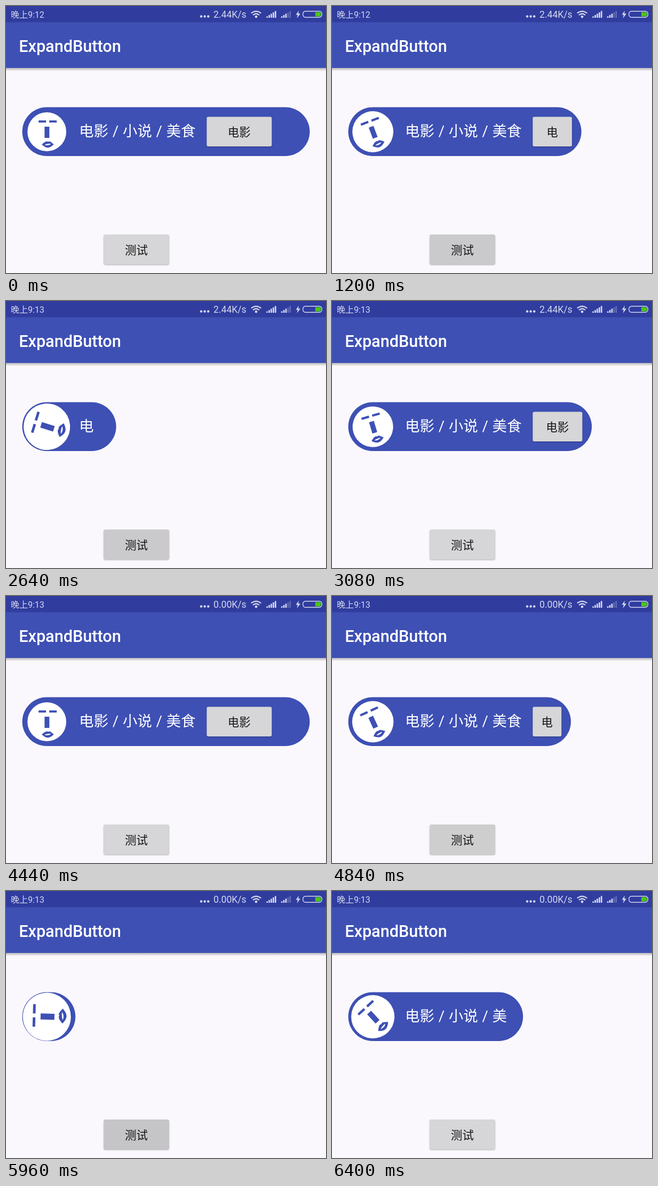
These frames come from a looping animation (600x500 px, 6.44 s). An HTML page:

```html
<!DOCTYPE html>
<html lang="zh-CN">
<head>
<meta charset="utf-8">
<title>ExpandButton</title>
<style>
  html, body { margin: 0; width: 100%; height: 100%; overflow: hidden; background: #faf8fc; }
  svg { display: block; width: 100vw; height: 100vh; }
  text { font-family: Roboto, "Noto Sans CJK SC", "Noto Sans CJK", sans-serif; }
  .status { font-size: 16px; fill: #d5d8ef; }
  .title { font-size: 30.6px; font-weight: 500; fill: #fff; }
  .label { font-size: 27.5px; word-spacing: .9px; fill: #fff; }
  .caption { font-size: 21.4px; fill: #151515; text-anchor: middle; }
  .raised { fill: #d6d5d7; filter: drop-shadow(0 1px 1px rgba(0, 0, 0, .3)); }
  .blue { fill: #3e50b4; }
</style>
</head>
<body>
<svg viewBox="0 0 600 500" preserveAspectRatio="none">
  <defs>
    <linearGradient id="shade" x1="0" y1="0" x2="0" y2="1">
      <stop offset="0" stop-color="#000" stop-opacity=".27"/>
      <stop offset="1" stop-color="#000" stop-opacity="0"/>
    </linearGradient>
    <clipPath id="labelClip"><rect id="labelBox" x="130" y="190" height="92"/></clipPath>
    <clipPath id="captionClip"><rect id="captionBox" y="190" height="92"/></clipPath>
  </defs>

  <rect width="600" height="500" fill="#faf8fc"/>
  <rect y="116" width="600" height="6" fill="url(#shade)"/>
  <rect class="blue" y="30" width="600" height="86"/>
  <rect width="600" height="30.5" fill="#303d9f"/>
  <text class="title" x="24.2" y="86">ExpandButton</text>

  <text class="status" id="clock" x="9" y="22"></text>
  <text class="status" id="speed" x="389" y="22.3" style="font-size:17.6px"></text>
  <g fill="#d5d8ef">
    <circle cx="366" cy="19.5" r="2.2"/>
    <circle cx="372.6" cy="19.5" r="2.2"/>
    <circle cx="379.2" cy="19.5" r="2.2"/>
    <circle cx="469" cy="20.1" r="2.4"/>
    <path d="M549 8.5L543.5 16.5H547L545.5 23L552 14.2H548Z"/>
  </g>
  <g fill="none" stroke="#d5d8ef" stroke-width="2.2">
    <path d="M459.8 13.4Q469 6.2 478.2 13.4M463 17Q469 12 475 17"/>
    <rect x="556.7" y="9.7" width="35.6" height="11.6" rx="5" stroke-width="1.4"/>
  </g>
  <path d="M580 11.4H588Q590.6 11.4 590.6 15.5T588 19.6H580Z" fill="#4cc417"/>
  <g id="signal" fill="#d5d8ef"></g>

  <rect class="blue" id="pill" x="30.5" y="189.5" height="91.5" rx="45.75"/>
  <g id="face">
    <circle r="36.4" fill="#fff"/>
    <path class="blue" d="M-15.5-21.3h14v4h-14zM4.5-21.3h14v4h-14zM-4.3-9.5h9v21h-9z"/>
    <g transform="translate(1.7 23.8)">
      <path class="blue" d="M-11.3 0Q-5-5.8-2-5.8Q0-5.8.5-5Q2-5.8 3.5-5.8Q6-5 11.3 0Q5 6 0 6Q-5 6-11.3 0Z"/>
      <path fill="#fff" d="M-6 .6Q-2-1.4 0-.9Q3-2 6-.8Q1 2.8-6 .6Z"/>
    </g>
  </g>
  <text class="label" id="label" x="137" y="243.6" clip-path="url(#labelClip)" xml:space="preserve"></text>
  <rect class="raised" id="option" x="376.3" y="207.5" height="55.5" rx="3"/>
  <g clip-path="url(#captionClip)"><text class="caption" id="caption" y="244.2"></text></g>

  <rect class="raised" x="183.3" y="428" width="122.4" height="56" rx="3"/>
  <rect id="ripple" x="183.3" y="428" width="122.4" height="56" rx="3"/>
  <text class="caption" x="244.5" y="464.6">测试</text>
</svg>
<script>
  const LOOP = 6440, STEP = 40, DURATION = 1020;
  const $ = id => document.getElementById(id);
  const set = (id, attrs) => {
    for (const k in attrs) $(id).setAttribute(k, attrs[k]);
  };
  const clamp = v => Math.min(1, Math.max(0, v));
  const ease = v => 0.5 - 0.5 * Math.cos(Math.PI * clamp(v));

  // press: ripple start, start: width change, open: resulting state
  const taps = [
    { press: 880, start: 877, open: false },
    { press: 2320, start: 2348, open: true },
    { press: 4440, start: 4484, open: false },
    { press: 5840, start: 5872, open: true }
  ];

  // places where the label may wrap: text so far and its right edge
  const breaks = [
    ["电", 0], ["电影 /", 211], ["电影 / 小", 246],
    ["电影 / 小说 /", 291], ["电影 / 小说 / 美", 327], ["电影 / 小说 / 美食", 354]
  ];

  function drawSignal(x, lit) {
    for (let i = 0; i < 5; i++) {
      const bar = document.createElementNS("http://www.w3.org/2000/svg", "rect");
      const h = 2.6 + i * 2.5;
      const attrs = { x: x + i * 3.9, y: 22 - h, width: 2.7, height: h, opacity: i < lit ? 1 : 0.3 };
      for (const k in attrs) bar.setAttribute(k, attrs[k]);
      $("signal").append(bar);
    }
  }

  function openness(t) {
    const tap = taps.filter(a => t >= a.start).pop();
    if (!tap) return 1;
    const v = ease((t - tap.start) / DURATION);
    return tap.open ? v : 1 - v;
  }

  function rippleAlpha(t) {
    const tap = taps.filter(a => t >= a.press).pop();
    if (!tap) return 0;
    const d = t - tap.press;
    return 0.08 * clamp(d / 120) * clamp((560 - d) / 360);
  }

  function render(t) {
    const p = openness(t);
    const right = 122 + 447.5 * p;
    set("pill", { width: right - 30.5 });

    const scale = (45.2 - 8.8 * p) / 36.4;
    set("face", { transform: `translate(76.6 235.5) rotate(${-90 * (1 - p)}) scale(${scale})` });

    const edge = right - 12;
    set("labelBox", { width: Math.max(0, edge - 130) });
    $("label").textContent = breaks.filter(b => b[1] <= edge).pop()[0];

    const w = Math.min(122, Math.max(0, right - 18 - 376));
    set("option", { width: w, visibility: w > 0 ? "visible" : "hidden" });
    set("captionBox", { x: 388, width: Math.max(0, w - 24) });
    set("caption", { x: 376.2 + w / 2 });
    $("caption").textContent = w < 79 ? "电" : "电影";

    set("ripple", { opacity: rippleAlpha(t) });
    $("clock").textContent = t < 2640 ? "晚上9:12" : "晚上9:13";
    $("speed").textContent = t < 4040 ? "2.44K/s" : "0.00K/s";
  }

  drawSignal(488.3, 5);
  drawSignal(515.8, 3);
  const origin = performance.now();
  function tick() {
    const t = (performance.now() - origin) % LOOP;
    render(Math.floor(t / STEP) * STEP);
    requestAnimationFrame(tick);
  }
  render(0);
  requestAnimationFrame(tick);
</script>
</body>
</html>
```
